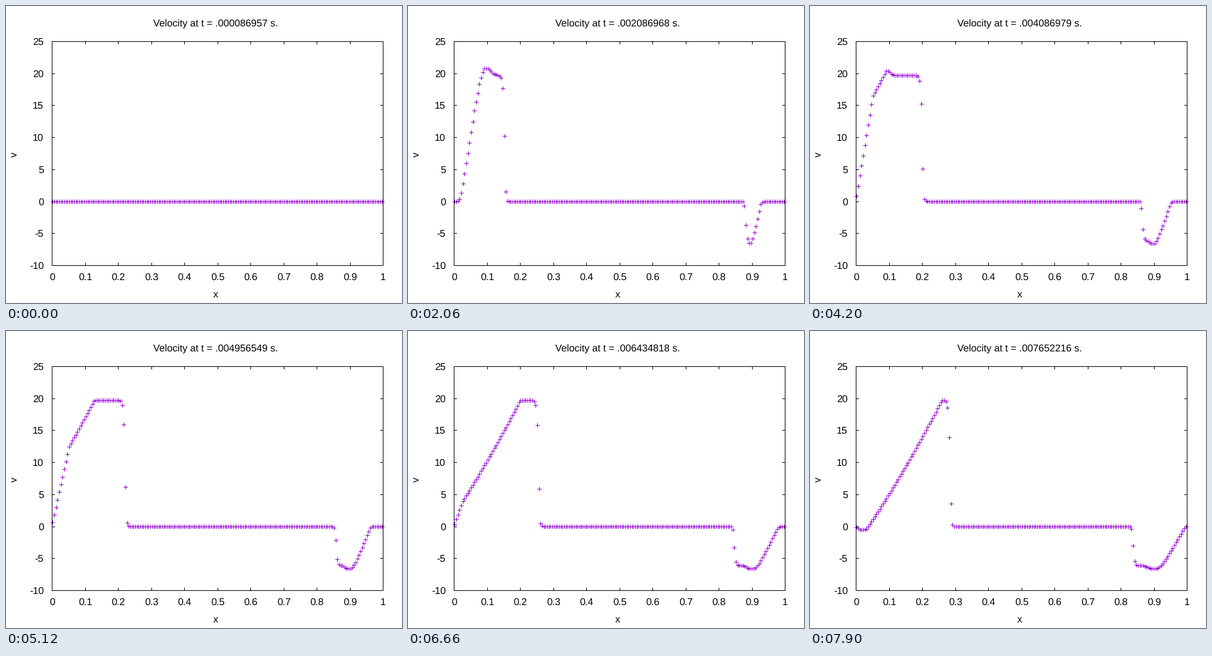
These frames come from a looping animation (640 px wide and 480 px high, 8000 ms). A matplotlib script:

```python
import numpy as np
import matplotlib.pyplot as plt
from matplotlib.animation import FuncAnimation
from matplotlib.collections import LineCollection

W, H, DPI = 640, 480, 100
X0, X1, Y0, Y1 = 74, 609, 419, 57       # plot box in pixels
N = 200                                 # grid cells
TICK_MS = 20
LOOP_MS = 8000
HOLDS = [100, 100, 100, 60, 60, 100, 100, 100, 100]
STARTS = np.cumsum([0] + HOLDS)

cells = np.arange(N)
cell_px = np.round(X0 + (cells + 0.5) * (X1 - X0) / N)

# Rarefaction fans: velocity level, starting cell, drift in cells per step.
LEFT_FAN = [(0, 17.4, -.657), (.4, 18.4, -.64), (1.7, 19.2, -.62), (8.4, 20, -.479),
            (14.6, 20.4, -.343), (19, 21, -.235), (21, 21.8, -.17)]
RIGHT_FAN = [(-6.25, 177.3, -.04), (-6.7, 177.7, .005), (-6.65, 178, .045),
             (-5.85, 178.2, .081), (-3.5, 179.3, .131), (-.4, 180.2, .2), (0, 181.6, .2)]


def fan(levels, step):
    v, start, drift = np.array(levels).T
    return np.interp(cells, start + drift * step, v)


def front(d):
    """Smeared shock: falls from 1 to 0 as the distance ahead of it grows."""
    d = np.clip(d, -3.8, 8)
    return 1 / (1 + np.exp(2.3 * d + 0.3 * d * d))


def left_wave(step):
    crest = 21.1 - 0.11 * step
    plateau = 19.9 + 1.35 * np.exp(-((cells - crest) / 2.8) ** 2 / 2)
    # Wave reflected by the wall, running after the shock.
    behind = 24.5 + 0.855 * (step - 57) - cells
    tail = 19.6 - 0.5 * behind + 0.0012 * behind ** 2
    from_wall = cells + 0.5
    wall = 2.15 * np.exp(-0.029 * (step - 37)) * from_wall
    v = np.minimum.reduce([fan(LEFT_FAN, step), plateau, tail, wall])
    return np.maximum(v, -np.minimum(0.5, 0.2 * from_wall))


def velocity(step):
    age = step - 1
    left_shock = 20.30 + 0.41 * step - 1.2 * np.exp(-age / 9.8)
    right_shock = 179 - 0.136 * step + 0.6 * np.exp(-age / 12)
    v = (left_wave(step) * front(cells - left_shock)
         + fan(RIGHT_FAN, step) * front(right_shock - cells))
    return v * (1 - np.exp(-age / 1.5))


def y_px(v):
    return Y0 - (v + 10) * (Y0 - Y1) / 35


def step_at(ms):
    rounds, rest = divmod(ms, int(STARTS[-1]))
    return len(HOLDS) * rounds + int(np.searchsorted(STARTS, rest, side="right"))


def hline(x, y, x_end):
    return [(x, y + 0.5), (x_end + 1, y + 0.5)]


def vline(x, y, y_end):
    return [(x + 0.5, y), (x + 0.5, y_end + 1)]


def crosses(v):
    segs = []
    for x, y in zip(cell_px, np.round(y_px(v))):
        segs += [hline(x - 3, y, x + 3), vline(x, y - 3, y + 3)]
    return segs


plt.rcParams["font.family"] = "Liberation Sans"
plt.rcParams["font.size"] = 16 * 72 / DPI
plt.rcParams["text.hinting"] = "none"
fig = plt.figure(figsize=(W / DPI, H / DPI), dpi=DPI, facecolor="white")
ax = fig.add_axes([0, 0, 1, 1])
ax.set_xlim(0, W)
ax.set_ylim(H, 0)
ax.axis("off")


def strokes(segs, color, z):
    lines = LineCollection(segs, colors=color, linewidths=72 / DPI,
                           capstyle="butt", zorder=z)
    lines.set_snap(False)
    ax.add_collection(lines, autolim=False)
    return lines


def label(x, y, s, ha="center", **kw):
    return ax.text(x, y, s, ha=ha, va="baseline", color="black", **kw)


box = [hline(X0, Y1, X1), hline(X0, Y0, X1), vline(X0, Y1, Y0), vline(X1, Y1, Y0)]
for j in range(11):
    x = round(X0 + j * (X1 - X0) / 10 + 0.01)
    box += [vline(x, Y0 - 4, Y0), vline(x, Y1, Y1 + 4)]
    label(x + 0.5, 443, f"{j / 10:g}")
for value in range(-10, 26, 5):
    y = round(y_px(value))
    box += [hline(X0, y, X0 + 4), hline(X1 - 4, y, X1)]
    label(61, y + 6, str(value), ha="right")
strokes(box, "black", 3)
label(338.5, 471, "x")
label(18, 240, "v", rotation=90, rotation_mode="anchor")

title = label(238, 33, "", ha="left")
marks = strokes([], "#9400d3", 2)
profiles = {}


def draw(frame):
    step = step_at(frame * TICK_MS)
    if step not in profiles:
        profiles[step] = crosses(velocity(step))
    marks.set_segments(profiles[step])
    title.set_text(f"Velocity at t = .{step * 86957:09d} s.")
    return marks, title


anim = FuncAnimation(fig, draw, frames=LOOP_MS // TICK_MS, interval=TICK_MS,
                     repeat=True, repeat_delay=0, blit=False)
plt.show()
```
